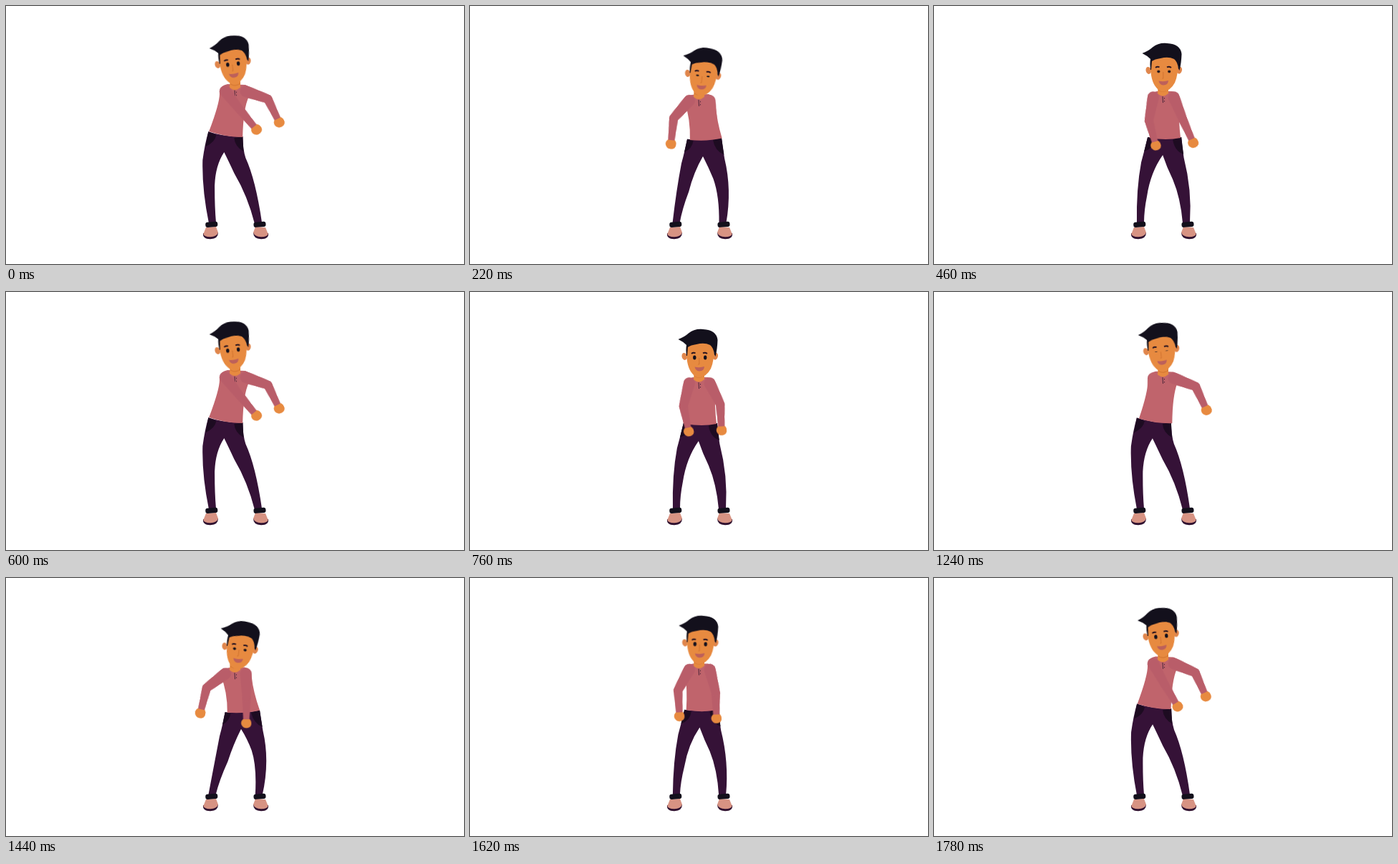
Recreate the animation shown at these times as an HTML page without scripts. Size 639 by 360 pixels, loop 1800 ms.

```html
<!DOCTYPE html>
<html lang="en">
<head>
<meta charset="utf-8">
<title>Dancing man</title>
<style>
html, body { margin: 0; width: 100%; height: 100%; overflow: hidden; background: #fff; }
svg { display: block; width: 100vw; height: 100vh; }

:root {
  --in: cubic-bezier(.35, 0, .6, .65);
  --out: cubic-bezier(.4, .35, .65, 1);
}
.skin { fill: #e78a40; }
.dark { fill: #13101c; }
.sleeve { fill: #b95d69; }

/* Body sway: one left-right-left swing */
.sway { animation: .6s -.58s infinite; }
.torso { fill: #c0646c; animation-name: torso; }
.legs { fill: #351237; animation-name: legs; animation-delay: -.57s; }
.pockets { fill: #1d0b21; animation-name: pockets; animation-delay: -.57s; }
.chest { animation-name: chest; }
.head { transform-origin: 320.5px 92px; animation-name: head; }

@keyframes torso {
  0%, 100% { animation-timing-function: var(--in); d: path("M298 122Q300 110 309 109L334 110Q341 112 339 126Q331 142 330 183Q306 183 283 175Q298 136 298 122Z"); }
  25%, 75% { animation-timing-function: var(--out); d: path("M300 130Q302 120 311 119L332 119Q341 121 342 132Q341 160 344 184Q324 188 301 184Q303 155 300 130Z"); }
  50% { animation-timing-function: var(--in); d: path("M299 136Q302 127 311 127L333 126Q343 128 343 140Q346 158 357 185Q336 190 311 189Q311 160 299 136Z"); }
}
@keyframes legs {
  0%, 100% { animation-timing-function: var(--in); d: path("M282 175Q306 183 330 182Q330 200 334 212Q348 242 357 302L347 304Q337 265 318 233Q310 216 304 204Q292 222 291 250Q291 280 293 302L283 303Q273 255 274 215Q277 192 282 175Z"); }
  25%, 75% { animation-timing-function: var(--out); d: path("M298 183Q322 187 345 183Q346 197 348.5 212Q360 257 357 302L347 303Q344 268 333 242Q325 226 319 208Q302 232 297 265Q293 285 293 302L283 303Q282 255 289 218Q294 200 298 183Z"); }
  50% { animation-timing-function: var(--in); d: path("M309 189Q336 190 358 185Q360 197 363 214Q372 255 358 303L348 304Q353 262 347 240Q342 224 332 212Q324 232 315 252Q300 280 292 304L282 303Q295 258 302 222Q307 203 309 189Z"); }
}
@keyframes pockets {
  0%, 100% { animation-timing-function: var(--in); d: path("M282 175L293 180Q291 190 278 196ZM330 182L318 184Q319 196 331 203Z"); }
  25%, 75% { animation-timing-function: var(--out); d: path("M298 183L308 186Q306 199 293 203ZM345 183L333 186Q335 202 348 207Z"); }
  50% { animation-timing-function: var(--in); d: path("M309 189L316 190Q314 201 306 205ZM358 185L346 188Q350 203 362 208Z"); }
}
@keyframes chest {
  0%, 100% { animation-timing-function: var(--in); transform: translateY(-8.5px); }
  25%, 75% { animation-timing-function: var(--out); transform: none; }
  50% { animation-timing-function: var(--in); transform: translateY(8px); }
}
@keyframes head {
  0%, 100% { animation-timing-function: var(--in); transform: translate(-4px, -10.5px) rotate(-6.5deg); }
  25%, 75% { animation-timing-function: var(--out); transform: rotate(0deg); }
  50% { animation-timing-function: var(--in); transform: translate(7px, 10.5px) rotate(10deg); }
}

/* Arms: six swings, each arm passes behind the back once */
.up, .fore, .eyes, .front { animation: 1.8s linear infinite; }
.l.up { animation-name: upL; }
.l.fore { animation-name: foreL; }
.r.up { animation-name: upR; }
.r.fore { animation-name: foreR; }
.front.l { animation-name: hideL; }
.front.r { animation-name: hideR; }

@keyframes upL {
  0%, 33.33%, 100% { transform: rotate(-38deg); }
  1.11%, 34.44% { transform: rotate(-41deg); }
  4.44%, 37.78% { transform: rotate(-22deg); }
  8.89% { transform: rotate(10deg); }
  13.33%, 46.67% { transform: rotate(52deg); }
  17.78%, 51.11%, 84.44% { transform: rotate(66deg); }
  21.11%, 87.78% { transform: rotate(48deg); }
  25.56%, 92.22% { transform: rotate(11deg); }
  30% { transform: rotate(-20deg); }
  42.22% { transform: rotate(14deg); }
  52.22% { transform: rotate(65deg); }
  55.56% { transform: rotate(40deg); }
  60% { transform: rotate(12deg); }
  67.78% { transform: rotate(0deg); }
  75.56% { transform: rotate(15deg); }
  80% { transform: rotate(53deg); }
  96.67% { transform: rotate(-16deg); }
  98.89% { transform: rotate(-28deg); }
}
@keyframes foreL {
  0%, 1.11%, 33.33%, 34.44%, 98.89%, 100% { transform: rotate(-2deg); }
  4.44%, 30%, 37.78%, 96.67% { transform: rotate(-8deg); }
  8.89%, 25.56%, 42.22%, 92.22% { transform: rotate(-26deg); }
  13.33%, 21.11%, 46.67%, 80%, 87.78% { transform: rotate(-39deg); }
  17.78%, 51.11%, 52.22%, 84.44% { transform: rotate(-47deg); }
  55.56% { transform: rotate(-40deg); }
  60%, 67.78%, 75.56% { transform: rotate(-28deg); }
}
@keyframes upR {
  0%, 33.33%, 66.67%, 100% { transform: rotate(-71deg); }
  1.11% { transform: rotate(-72deg); }
  4.44% { transform: rotate(-61deg); }
  8.89%, 75.56% { transform: rotate(-27deg); }
  13.33%, 46.67%, 80% { transform: rotate(-2deg); }
  17.22% { transform: rotate(2deg); }
  21.11% { transform: rotate(-5deg); }
  25.56% { transform: rotate(-22deg); }
  30%, 63.33%, 96.67% { transform: rotate(-55deg); }
  35.56%, 68.89% { transform: rotate(-70deg); }
  42.22%, 92.22% { transform: rotate(-27deg); }
  50%, 83.89% { transform: rotate(10deg); }
  52.22% { transform: rotate(7deg); }
  58.89% { transform: rotate(-18deg); }
  86.67% { transform: rotate(5deg); }
  98.89% { transform: rotate(-67deg); }
}
@keyframes foreR {
  0%, 1.11%, 33.33%, 35.56%, 66.67%, 68.89%, 100% { transform: rotate(45deg); }
  4.44% { transform: rotate(37deg); }
  8.89%, 42.22%, 75.56% { transform: rotate(24deg); }
  13.33%, 46.67%, 80% { transform: rotate(2deg); }
  17.22% { transform: rotate(25deg); }
  21.11% { transform: rotate(10deg); }
  25.56% { transform: rotate(-2deg); }
  30%, 63.33%, 96.67% { transform: rotate(32deg); }
  50%, 52.22%, 83.89% { transform: rotate(15deg); }
  58.89%, 92.22% { transform: rotate(12deg); }
  98.89% { transform: rotate(43deg); }
}
@keyframes hideL {
  0%, 57.2%, 76.7%, 100% { visibility: visible; }
  57.21%, 76.69% { visibility: hidden; }
}
@keyframes hideR {
  0%, 7.2%, 25%, 100% { visibility: visible; }
  7.21%, 24.99% { visibility: hidden; }
}

.eyes { transform-origin: 320px 91.5px; animation-name: blink; }
@keyframes blink {
  0%, 5.5%, 33.3%, 57.8%, 87.8%, 100% { transform: none; }
  15%, 68.3%, 69.5% { transform: scaleY(.14); }
  25.56%, 80% { transform: scaleY(.6); }
}
</style>
</head>
<body>
<svg viewBox="0 0 639 360">
  <defs>
    <path id="upper" d="M-8 0A8 8 0 0 1 8 0L6 32.5A6 6 0 0 1-6 32.5Z"/>
    <path id="lower" d="M-6 0L-4.3 31H4.3L6 0Z"/>
    <path id="hand" d="M-4 30.5Q-8 33-7 38Q-5 43.5 1 43.2Q7 42.5 7 37Q7 32 4 30.5Z"/>
    <g id="shoe">
      <path fill="#301230" d="M275 317Q274 325 285 325.3Q296 325 296 316Z"/>
      <path fill="#d79383" d="M279 309L293 308L296 316Q294 322 285 322.3Q276 322 275.3 318Z"/>
    </g>
  </defs>

  <g class="sway chest">
    <g transform="translate(306 127.5)"><g class="l up">
      <g transform="translate(0 32.5)"><g class="l fore"><use href="#hand" class="skin"/><use href="#lower" class="sleeve"/></g></g>
      <use href="#upper" class="sleeve"/>
    </g></g>
    <g transform="translate(334.5 127.5)"><g class="r up">
      <g transform="translate(0 32.5)"><g class="r fore"><use href="#hand" class="skin"/><use href="#lower" class="sleeve"/></g></g>
      <use href="#upper" class="sleeve"/>
    </g></g>
  </g>

  <use href="#shoe"/>
  <use href="#shoe" transform="matrix(-1 0 0 1 641 0)"/>
  <path class="sway legs"/>
  <path class="sway pockets"/>
  <g class="dark">
    <rect x="278.3" y="301.2" width="17" height="7.2" rx="3" transform="rotate(-5 287 305)"/>
    <rect x="345.5" y="301.2" width="17" height="7.2" rx="3" transform="rotate(-5 354 305)"/>
  </g>

  <path class="sway torso"/>
  <g class="sway chest">
    <path class="skin" d="M312.5 113H327V122Q320 128.5 312 122.5Z"/>
    <path fill="none" stroke="#d0732f" d="M313 117Q320 122 327 116"/>
    <path fill="none" stroke="#4a2438" d="M319 126L319.5 135M321.5 128v1.5M321.5 132v1.5"/>
  </g>

  <g class="sway head">
    <g fill="#e0864c">
      <ellipse cx="299.2" cy="90" rx="3.6" ry="5" transform="rotate(-15 299 90)"/>
      <ellipse cx="342.2" cy="89.5" rx="3.6" ry="5" transform="rotate(15 342 90)"/>
    </g>
    <path class="skin" d="M302 75Q301 100 308 111Q314 120 320 119.5Q330 118 336 107Q341 95 341 75Q322 64 302 75Z"/>
    <path class="dark" d="M290.5 66Q299 63 305 57.5Q313 51 325 52Q344 53 345.5 67Q345 80 342.5 90L340.8 87Q340 78 335 74Q327 70 316 73Q308 74 304 77L303 89H302Q301 80 302 74Q297 69 290.5 66Z"/>
    <path fill="none" stroke="#2a1420" stroke-width="2" d="M309 86Q311.5 84 314.5 85.3M325 85.3Q328 84 331 86"/>
    <g class="eyes dark">
      <ellipse cx="313.3" cy="91.5" rx="2.2" ry="3"/>
      <ellipse cx="328.2" cy="91.5" rx="2.2" ry="3"/>
    </g>
    <path fill="none" stroke="#d0732f" d="M319.8 92V101H318.3"/>
    <path fill="#bd605a" d="M313.5 104.5Q320.5 106 327 104Q326.5 110.5 320 110.5Q314.5 110 313.5 104.5Z"/>
  </g>

  <g class="sway chest">
    <g class="front l"><g transform="translate(306 127.5)"><g class="l up">
      <g transform="translate(0 32.5)"><g class="l fore"><use href="#hand" class="skin"/><use href="#lower" class="sleeve"/></g></g>
      <use href="#upper" class="sleeve"/>
    </g></g></g>
    <g class="front r"><g transform="translate(334.5 127.5)"><g class="r up">
      <g transform="translate(0 32.5)"><g class="r fore"><use href="#hand" class="skin"/><use href="#lower" class="sleeve"/></g></g>
      <use href="#upper" class="sleeve"/>
    </g></g></g>
  </g>
</svg>
</body>
</html>
```
